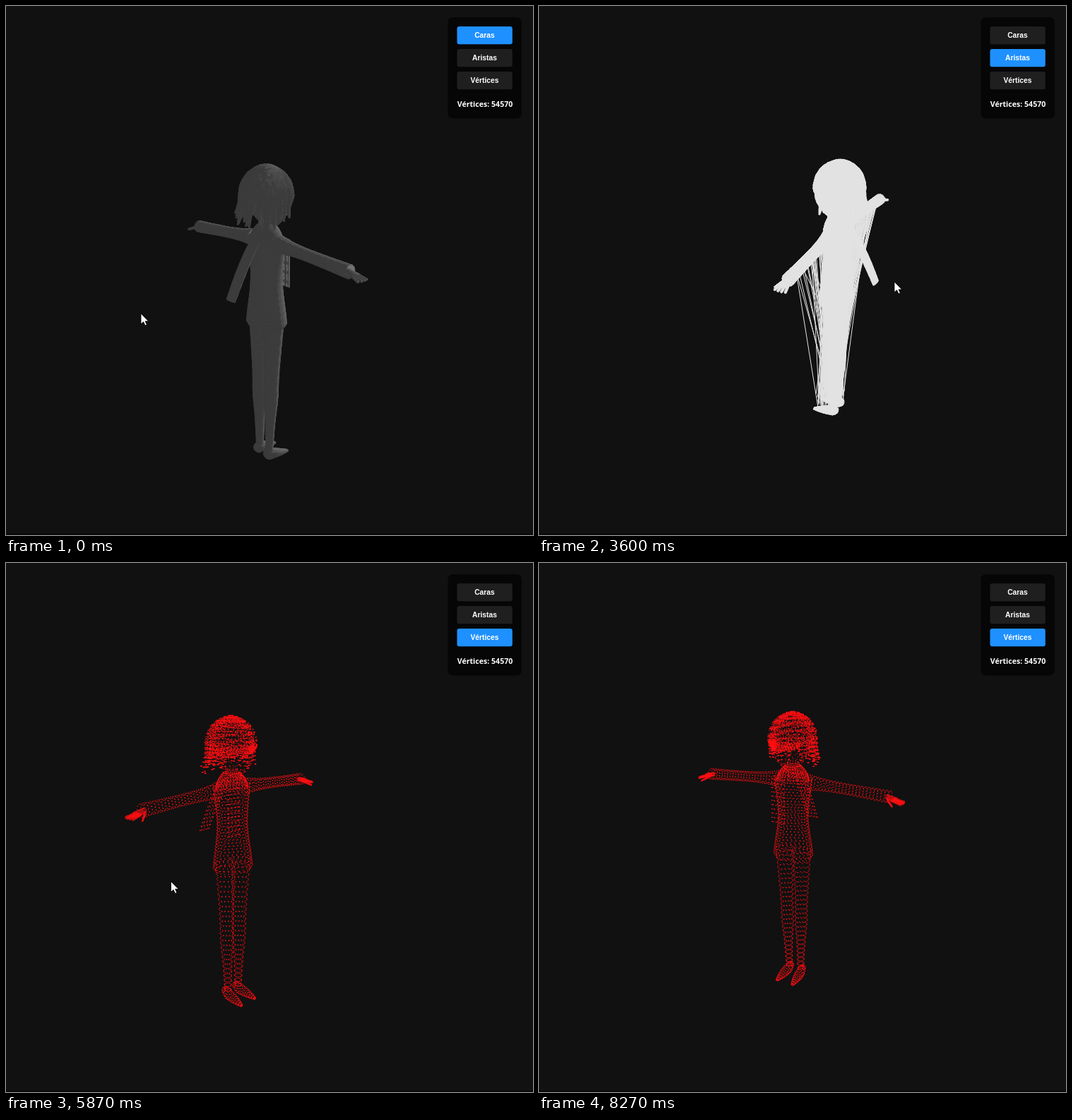
Write an HTML page with a canvas that moves like this. It is 746 by 750 pixels and loops after 8.34 s.

```html
<!DOCTYPE html>
<html lang="es">
<head>
<meta charset="utf-8">
<title>Visor de malla</title>
<style>
html, body { margin: 0; width: 100%; height: 100%; overflow: hidden; background: #111; }
canvas, svg { position: absolute; left: 0; top: 0; display: block; }
text { fill: #fff; text-anchor: middle; }
.label { font: bold 10.3px "Liberation Sans", Arial, sans-serif; }
.count { font: bold 10.6px "Open Sans", "Noto Sans", sans-serif; }
</style>
</head>
<body>
<canvas id="view" width="746" height="750"></canvas>
<svg width="746" height="750" viewBox="0 0 746 750">
  <rect y="748" width="746" height="2" fill="#090909"/>
  <rect x="625.5" y="16" width="104.5" height="143.5" rx="7" fill="#060606"/>
  <g id="buttons"></g>
  <text class="count" x="678" y="143.4">Vértices: 54570</text>
  <path id="arrow" d="M0 0V15L3.5 11.8L6 17L8.4 16L6.1 10.9H10.6Z" fill="#fff" stroke="#000" stroke-width=".8"/>
  <path id="hand" d="M-1.6 1.2Q0-1 1.6 1.2V6.5Q3 5.6 4 7Q5.6 6.2 6.4 7.8Q8.6 7.6 8.5 10V13Q8 15 7 18H-.8Q-2 14.5-4.8 11.5Q-5.5 9.6-3.4 9.6L-1.6 11Z" fill="#fff" stroke="#000" stroke-width=".8"/>
</svg>
<script>
const LOOP = 8340, FOCAL = 905, TAU = Math.PI * 2;
const MODE_START = [-LOOP, 2470, 5130];
const ctx = document.getElementById('view').getContext('2d');

let seed = 7;
const random = () => (seed = seed * 16807 % 2147483647) / 2147483647;
const between = (a, b) => lerp(a, b, random());
const lerp = (a, b, k) => a + (b - a) * k;
const mix = (a, b, k) => a.map((v, i) => lerp(v, b[i], k));
const clamp = k => Math.min(1, Math.max(0, k));
const bump = (x, center, width) => Math.exp(-(((x - center) / width) ** 2));

// ---- Mesh
const verts = [], faces = [];
const light = [-0.1, 0.45, 0.88];

function shadeOf(p, center) {
  const sub = (a, b) => a.map((v, i) => v - b[i]);
  const dot = (a, b) => a[0] * b[0] + a[1] * b[1] + a[2] * b[2];
  const a = sub(p[2], p[0]), b = sub(p[3], p[1]);
  const n = [a[1] * b[2] - a[2] * b[1], a[2] * b[0] - a[0] * b[2], a[0] * b[1] - a[1] * b[0]];
  const sign = dot(n, sub(mix(p[0], p[2], 0.5), center)) < 0 ? -1 : 1;
  return Math.round(60 + 58 * Math.max(0, sign * dot(n, light) / (Math.hypot(...n) || 1)));
}

// ringAt(s) gives [side, height, front, radius, radius] for s from 0 to 1
function tube(axis, rows, cols, ringAt) {
  const [p, q] = [0, 1, 2].filter(i => i !== axis);
  const start = verts.length, rings = [];
  for (let i = 0; i < rows; i++) {
    const ring = ringAt(i / (rows - 1));
    rings.push(ring);
    for (let j = 0; j < cols; j++) {
      const angle = (j + (i % 2) * 0.3) / cols * TAU, v = ring.slice(0, 3);
      v[p] += ring[3] * Math.cos(angle);
      v[q] += ring[4] * Math.sin(angle);
      verts.push(v);
    }
  }
  for (let i = 0; i < rows - 1; i++) {
    const center = mix(rings[i], rings[i + 1], 0.5);
    for (let j = 0; j < cols; j++) {
      const n = (j + 1) % cols, a = start + i * cols, b = a + cols;
      const ids = [a + j, a + n, b + n, b + j];
      faces.push({ ids, shade: shadeOf(ids.map(id => verts[id]), center) });
    }
  }
}

// A lock runs over the skull, then hangs straight and flares at the tip
function strand(angle) {
  const facing = Math.cos(angle), front = facing > 0.45;
  const end = front ? between(100, 110) : between(80, 95);
  const flare = front ? -3 : between(0, 4) + Math.max(0, -facing) * between(0, 13);
  const first = between(0, 0.25), wave = between(-0.15, 0.15);
  tube(1, 10, 5, k => {
    const s = lerp(first, 1, k), fall = Math.max(0, 2 * s - 1), rise = Math.min(0.5, s) * Math.PI;
    const r = 32 * Math.sin(rise) + flare * fall ** 2;
    const turn = angle + (front ? -0.35 : wave) * s, w = lerp(4, 0.8, fall ** 2);
    const y = lerp(118 + 37 * Math.cos(rise), end, fall);
    return [r * Math.sin(turn), y, r * Math.cos(turn), w, w];
  });
}

function head() {
  tube(1, 15, 20, s => {
    const r = 30 * Math.sin(Math.PI * (0.06 + 0.86 * s)) ** 0.8;
    return [0, lerp(76, 150, s), 8 * (1 - s), r, r];
  });
  tube(1, 9, 24, s => {
    const a = lerp(0.1, 1.55, s), r = 33 * Math.sin(a);
    return [0, 118 + 39 * Math.cos(a), -3 * s, r, r];
  });
  for (let i = 0; i < 46; i++) strand(i / 46 * TAU);
}

function trunk() {
  tube(1, 5, 12, s => [0, lerp(58, 84, s), 0, 8, 8]);
  tube(1, 11, 30, s => [0, lerp(57, 79, s), 0, 25 - 13 * s * s, 19 - 7 * s * s]);
  tube(1, 30, 26, s => {
    const cap = Math.min(1, 0.5 + 8 * s, 0.9 + 3 * (1 - s));
    return [0, lerp(70, -61, s), 0, (27 + 4 * Math.cos(TAU * s)) * cap, (18 + 7 * s * s) * cap];
  });
  tube(1, 11, 10, s => [-15, lerp(60, -5, s), 18, 11, 1.2]);
  tube(1, 13, 10, s => [0, lerp(64, -13, s), -14 - 46 * s ** 0.8, 9, 2 + 2 * Math.sin(Math.PI * s)]);
}

function leg(side) {
  tube(1, 27, 13, s => {
    const r = 14 - 9.5 * s ** 0.8 + 1.5 * bump(s, 0.6, 0.12);
    return [side * (15 - 4.5 * s), lerp(-50, -250, s), -4 * s, r, r + 1];
  });
  tube(2, 12, 12, s => [side * (11 + 3 * s), -254 - 9 * s, lerp(-13, 28, s),
    7 * Math.sin(Math.PI * (0.15 + 0.75 * s)), lerp(11, 1.5, s) * Math.min(1, 0.4 + 4 * s)]);
}

function arm(side) {
  tube(0, 25, 12, s => {
    const r = 7 + 5 * (1 - s) ** 5 + 1.5 * s * s;
    return [side * lerp(25, 151, s), 57 - 7 * s, -3 * s, r, r];
  });
  tube(0, 7, 12, s => [side * lerp(147, 160, s), 50 - 3 * s, -2, 2.8, 4 + 2 * s]);
  for (let j = 0; j < 4; j++) {
    const v = j * 3.6 - 7;
    tube(0, 8, 6, s => [side * lerp(157, 171 - Math.abs(j - 1.5), s), 47 - 3.5 * s, v * (1 + 0.35 * s), 1.4, 1.4]);
  }
  tube(0, 7, 6, s => [side * lerp(150, 160, s), 47 - 6 * s, 3 + 8 * s, 1.8 - s, 1.8 - s]);
}

// Stray edges hang from the arms and trunk down to the feet
const strays = [];
function addStrays(count, makeStart, makeSide) {
  for (let i = 0; i < count; i++) {
    const side = makeSide(), low = random() < 0.65;
    strays.push([makeStart(side), low
      ? [side * between(4, 18), between(-225, -262), between(-12, 25)]
      : [side * 15, between(-70, -220), between(0, 8)]]);
  }
}

head();
trunk();
for (const side of [-1, 1]) {
  leg(side);
  arm(side);
  const fromArm = s => [s * (26 + 112 * random() ** 1.5), 50, between(-7, 1)];
  addStrays(side < 0 ? 110 : 42, fromArm, () => side);
}
addStrays(240, s => [s * between(0, 24), between(30, -55), between(-16, 16)], () => random() < 0.5 ? -1 : 1);

// ---- Motion: pointer moves to (x, y); a drag also turns the figure
const gestures = [
  { from: 130, to: 600, x: 566, y: 398 },
  { from: 800, to: 1900, x: 280, y: 405, turn: -137.5 },
  { from: 1950, to: 2330, x: 674, y: 78 },
  { from: 2560, to: 3130, x: 733, y: 400 },
  { from: 3130, to: 4070, x: 274, y: 382, turn: -221 },
  { from: 4090, to: 4330, x: 588.5, y: 242.5 },
  { from: 4500, to: 4950, x: 676, y: 108 },
  { from: 5180, to: 5390, x: 411, y: 440 },
  { from: 5390, to: 6230, x: 101, y: 460, turn: -148.5 },
  { from: 6270, to: 6650, x: 493.5, y: 403 },
  { from: 6870, to: 7670, x: 70, y: 770, turn: -13 }
];

function stateAt(t) {
  const state = { x: 191, y: 436, yaw: 130.5 };
  for (const { from, to, x, y, turn = 0 } of gestures) {
    const k = clamp((t - from) / (to - from));
    state.x = lerp(state.x, x, k);
    state.y = lerp(state.y, y, k);
    state.yaw += turn * k;
  }
  state.pitch = 17 + 12 * bump(t, 3600, 350) - 4 * bump(t, 5000, 1250);
  return state;
}

function camera({ yaw, pitch }) {
  const rad = Math.PI / 180, ca = Math.cos(yaw * rad), sa = Math.sin(yaw * rad);
  const ce = Math.cos(pitch * rad), se = Math.sin(pitch * rad);
  return ([side, y, front]) => {
    const u = side - 37, v = front - 37;
    const near = v * ca - u * sa, depth = FOCAL - near * ce - y * se, k = FOCAL / depth;
    return [373 + (u * ca + v * sa) * k, 375 + (near * se - y * ce) * k, depth];
  };
}

// ---- Drawing
function drawFaces(points, paint) {
  ctx.lineWidth = 0.7;
  ctx.lineJoin = 'round';
  for (const { ids, shade } of faces) {
    ctx.fillStyle = ctx.strokeStyle = paint(shade);
    ctx.beginPath();
    for (const id of ids) ctx.lineTo(points[id][0], points[id][1]);
    ctx.closePath();
    ctx.fill();
    ctx.stroke();
  }
}

function drawSolid(points) {
  for (const f of faces) f.depth = f.ids.reduce((sum, id) => sum + points[id][2], 0);
  faces.sort((a, b) => b.depth - a.depth);
  drawFaces(points, g => `rgb(${g},${g},${g})`);
}

function drawEdges(points, project) {
  drawFaces(points, () => '#e2e2e2');
  ctx.lineWidth = 1;
  ctx.beginPath();
  for (const [from, to] of strays) {
    ctx.moveTo(...project(from).slice(0, 2));
    ctx.lineTo(...project(to).slice(0, 2));
  }
  ctx.stroke();
}

function drawPoints(points) {
  ctx.fillStyle = '#ff1013';
  for (const [x, y] of points) ctx.fillRect(x - 0.6, y - 0.6, 1.2, 1.2);
}

// ---- Panel
function svgNode(tag, attrs, parent) {
  const node = document.createElementNS('http://www.w3.org/2000/svg', tag);
  for (const name in attrs) node.setAttribute(name, attrs[name]);
  return parent.appendChild(node);
}
const buttons = ['Caras', 'Aristas', 'Vértices'].map((text, i) => {
  const y = 29 + 32 * i, group = svgNode('g', {}, document.getElementById('buttons'));
  const rect = svgNode('rect', { x: 638.5, y, width: 78.3, height: 25.3, rx: 3 }, group);
  svgNode('text', { class: 'label', x: 677.5, y: y + 16.4 }, group).textContent = text;
  return { y, group, rect };
});
const arrow = document.getElementById('arrow'), hand = document.getElementById('hand');

function drawPanel(t, mode, { x, y }) {
  const fade = clamp((t - MODE_START[mode] + 40) / 140);
  let over = false;
  buttons.forEach(({ y: top, group, rect }, i) => {
    const hover = x > 639 && x < 717 && y >= top && y < top + 25;
    over = over || hover;
    const idle = hover ? [58, 58, 58] : [31, 31, 31];
    const on = i === mode ? fade : i === mode - 1 ? 1 - fade : 0;
    rect.setAttribute('fill', `rgb(${mix(idle, [30, 144, 255], on).map(Math.round)})`);
    group.setAttribute('transform', `translate(0 ${hover ? -1.7 : 0})`);
  });
  for (const node of [arrow, hand]) {
    node.setAttribute('transform', `translate(${x} ${y})`);
    node.style.display = (node === hand) === over ? '' : 'none';
  }
}

function render(t) {
  const state = stateAt(t), project = camera(state), points = verts.map(project);
  const mode = MODE_START.filter(start => t >= start).length - 1;
  ctx.fillStyle = '#111';
  ctx.fillRect(0, 0, 746, 750);
  [drawSolid, drawEdges, drawPoints][mode](points, project);
  drawPanel(t, mode, state);
}

const began = performance.now();
function tick() {
  render((performance.now() - began) % LOOP);
  requestAnimationFrame(tick);
}
tick();
</script>
</body>
</html>
```
